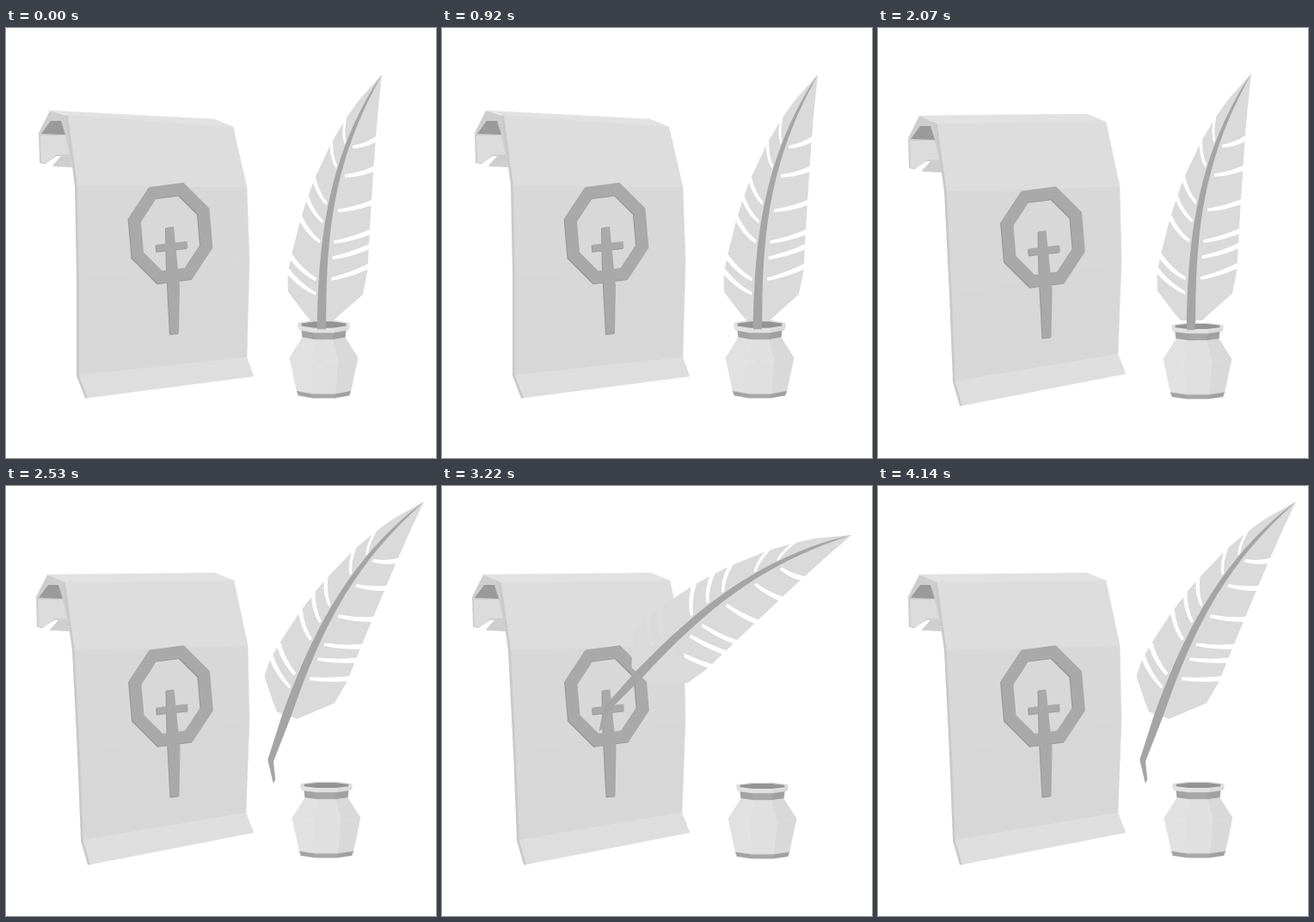
An HTML page for the animation above (4.37 s loop, 500x500 px).

```html
<!DOCTYPE html>
<html lang="en">
<head>
<meta charset="utf-8">
<title>Scroll and quill</title>
<style>
html, body { margin: 0; width: 100%; height: 100%; overflow: hidden; background: #fff; }
svg { display: block; width: 100%; height: 100%; }
</style>
</head>
<body>
<svg viewBox="0 0 500 500"><g id="scene"></g></svg>
<script>
const STEP = 230;
const TIMELINE = 'ABABABCBCBCDEFEFEFD';
const DARK = '#a5a5a5';

const range = n => Array.from({ length: n }, (_, i) => i);
const poly = (fill, points, attrs = '') => `<polygon fill="${fill}" points="${points}" ${attrs}/>`;
const place = (x, y, content, angle = 0) =>
  `<g transform="translate(${x} ${y}) rotate(${angle})">${content}</g>`;

// Octagon with corners on an ellipse, turned by twist degrees.
const octagon = (cx, cy, rx, ry, twist = 0) => range(8).map(k => {
  const a = (22.5 + 45 * k + twist) * Math.PI / 180;
  return [cx + rx * Math.cos(a), cy + ry * Math.sin(a)];
});

// ---- Feather: the tip is at 0,0 and u runs from vane base to tip ----
function spine(u) {
  const v = 1 - u, a = v ** 3, b = 3 * u * v * v, c = 3 * u * u * v;
  return [-70 * a - 69 * b - 59 * c, 287 * a + 186 * b + 96 * c];
}
function beside(u, distance) {
  const [x, y] = spine(u), [x1, y1] = spine(u - 0.01);
  const length = Math.hypot(x - x1, y - y1);
  return [x + distance * (y1 - y) / length, y + distance * (x - x1) / length];
}
const sides = [
  { sign: -1, width: u => 48 * (1 - u) ** 0.8, sweep: 0.075, gaps: [0.1, 0.155, 0.305, 0.385, 0.46, 0.61, 0.71] },
  { sign: 1, width: u => 52 * (1 - u ** 3), sweep: 0.055, gaps: [0.16, 0.245, 0.31, 0.44, 0.585, 0.705] }
];
function vane({ sign, width, sweep, gaps }) {
  const at = (u, part = 1) => beside(u, sign * part * width(u) * Math.min(1, 0.25 + 6 * u));
  const notch = g => {
    const outer = g + sweep, bend = g + sweep * 0.3;
    return `L${at(outer)}Q${at(bend, 0.6)} ${at(g, 0.2)}` +
      `L${at(g + 0.012, 0.18)}Q${at(bend + 0.02, 0.6)} ${at(outer + 0.024)}`;
  };
  return `<path fill="#dadada" d="M${spine(0)}L${at(0)}L${at(0.03)}L${at(0.11)}` +
    `${gaps.map(notch).join('')}L${at(0.88)}L0 0${range(11).map(i => 'L' + spine(1 - i / 10)).join('')}Z"/>`;
}
function shaft() {
  const edge = sign => range(21).map(i => beside(i / 20, sign * 5.2 * (1 - i / 20) ** 0.6));
  return poly(DARK, [[-59, 367], [-74, 343], ...edge(-1), ...edge(1).reverse(), [-67, 343], [-58, 362]]);
}
const feather = sides.map(vane).join('') + shaft();

// ---- Pot: stacked octagonal rings, of which three facets face the viewer ----
const ring = (y, r, tilt) => octagon(371.5, y, r, r * tilt);
const shades = {
  light: ['#d9d9d9', '#e0e0e0', '#e1e1e1'],
  dark: ['#a0a0a0', '#a8a8a8', '#a3a3a3']
};
function band(y0, r0, y1, r1, shade, tilt) {
  const top = ring(y0, r0, tilt), bottom = ring(y1, r1, tilt);
  return shades[shade].map((fill, k) =>
    poly(fill, [top[k], top[k + 1], bottom[k + 1], bottom[k]], `stroke="${fill}" stroke-width=".4"`)).join('');
}
const potBack = tilt => poly('#dedede', ring(347, 32.5, tilt)) + poly('#949494', ring(347, 28, tilt * 0.8));
const potFront = tilt =>
  band(351, 28, 360, 27, 'dark', tilt) +
  band(347, 32.5, 351, 31, 'light', tilt) +
  band(360, 27, 382.5, 43, 'light', tilt) +
  band(382.5, 43, 422, 34, 'light', tilt) +
  band(422, 34, 427, 32, 'dark', tilt);

// ---- Scroll: rows of left and right corners joined into faces ----
const emblemShapes = color =>
  poly('none', octagon(191.5, 238.5, 43.5, 53.5, -6), `stroke="${color}" stroke-width="14"`) +
  poly(color, '186,232 195,231 202,300 201,355 191,356 187,280') +
  `<path d="M175 256L211 252" stroke="${color}" stroke-width="8"/>`;
const emblem = place(-1, 1, emblemShapes('#979797')) + emblemShapes('#a9a9a9');

const roll =
  poly('#cecece', '0,0 20,6 26,66 6,65 -12,61 -13,26') +
  poly('#9a9a9a', '-10,27 1,12 13,12 18,28') +
  poly('#dcdcdc', '-11,29 18,29 23,51 8,51 -2,61 -10,60') +
  poly('#fff', '-8,64 8,53 13,53 3,64');

const faceFills = ['#e2e2e2', '#dddddd', '#d8d8d8', '#d7d7d7', '#dedede'];
function scroll(rows, emblemX, emblemY) {
  const left = rows.map(([x, y]) => [x, y]), right = rows.map(([, , x, y]) => [x, y]);
  const faces = faceFills.map((fill, i) =>
    poly(fill, [left[i], right[i], right[i + 1], left[i + 1]], `stroke="${fill}" stroke-width=".5"`));
  const rim = `<polyline points="${left.slice(1)}" fill="none" stroke="#c9c9c9" stroke-width="6"/>`;
  return place(...left[0], roll) + rim + faces.join('') + place(emblemX, emblemY, emblem);
}
const scrollHigh = scroll([
  [51, 96, 242, 106], [72, 101, 264, 115], [83, 183, 280, 185],
  [85, 290, 283, 270], [85, 404, 280, 383], [95, 430, 288, 405]], 0, 0);
const scrollLow = scroll([
  [48, 102, 243, 100], [69, 111, 265, 109], [80, 190, 281, 184],
  [86, 310, 283, 270], [90, 411, 279, 379], [98, 439, 288, 402]], 0.5, 4.5);

// ---- Poses ----
function pose(sheet, [tipX, tipY, angle], { dipped, potX = 0, potY = 0, tilt = 0.14 }) {
  const back = place(potX, potY, potBack(tilt)), front = place(potX, potY, potFront(tilt));
  const quill = place(tipX, tipY, feather, angle);
  return sheet + (dipped ? back + quill + front : back + front + quill);
}
const lowered = place(0, 1, scrollLow);
const poses = {
  A: pose(scrollHigh, [437, 54, 0], { dipped: true, potX: -2, potY: -2, tilt: 0.18 }),
  B: pose(scrollLow, [434, 53, 0], { dipped: true }),
  C: pose(lowered, [443, 34, 2], { dipped: true, potY: 1 }),
  D: pose(lowered, [486, 18, 19], { potX: 1, potY: 1 }),
  E: pose(lowered, [476, 57, 43], { potX: 1, potY: 2 }),
  F: pose(lowered, [495, 56, 43], { potX: 1, potY: 2 })
};

const scene = document.getElementById('scene');
let shown = '';
function draw() {
  const name = TIMELINE[Math.floor(performance.now() / STEP) % TIMELINE.length];
  if (name !== shown) scene.innerHTML = poses[shown = name];
  requestAnimationFrame(draw);
}
draw();
</script>
</body>
</html>
```
